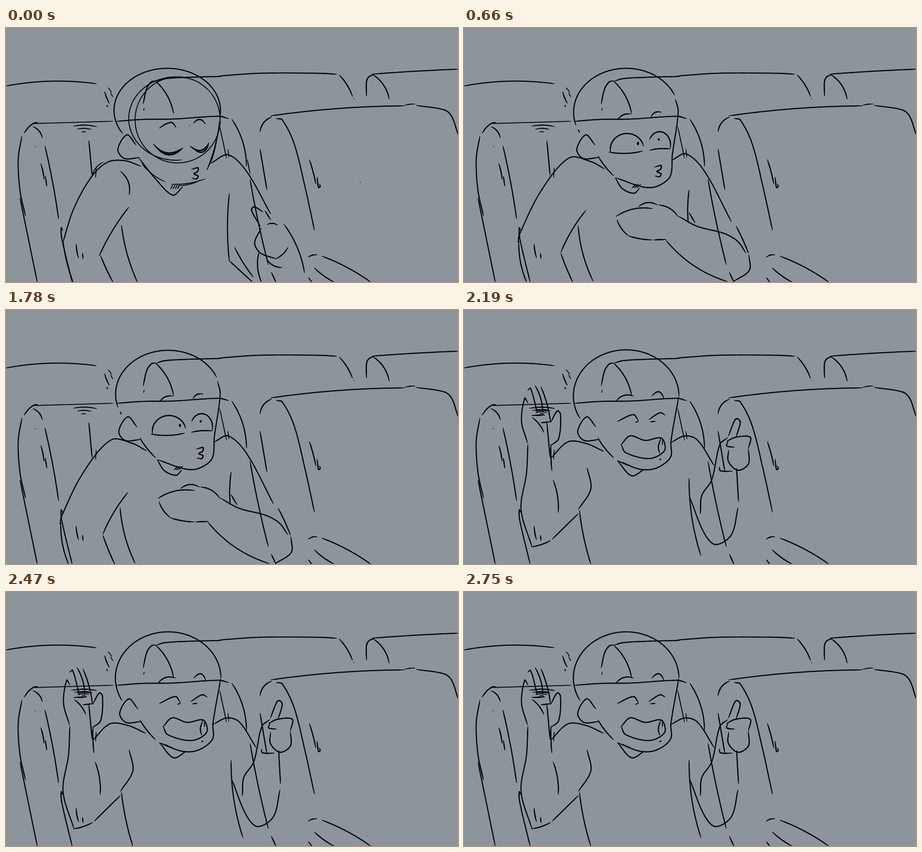
An HTML page with a canvas that plays this animation: 998 by 561 pixels, repeating every 3.04 s.

```html
<!DOCTYPE html>
<html lang="en">
<head>
<meta charset="utf-8">
<title>Seat sketch</title>
<style>
html, body { margin: 0; width: 100%; height: 100%; overflow: hidden; background: #8d959c; }
canvas { display: block; width: 998px; height: 561px; }
</style>
</head>
<body>
<canvas id="stage" width="998" height="561"></canvas>
<script>
const ctx = document.getElementById("stage").getContext("2d");
const INK = "#060708", PAPER = "#8d959c", LOOP = 3040, PEN = 2.45, FINE = 1.8;
const gap = (a, b) => Math.hypot(b[0] - a[0], b[1] - a[1]);

// Brush stroke along points, thinner at both ends
function ink(pts, w) {
  const run = [0];
  for (let i = 1; i < pts.length; i++) run.push(run[i - 1] + gap(pts[i - 1], pts[i]));
  const total = run[run.length - 1];
  for (let i = 1; i < pts.length; i++) {
    const s = (run[i] + run[i - 1]) / 2;
    ctx.lineWidth = w * Math.min(1, 0.55 + Math.min(s, total - s) / 22);
    ctx.beginPath();
    ctx.moveTo(...pts[i - 1]);
    ctx.lineTo(...pts[i]);
    ctx.stroke();
  }
}
function trace(f, w, steps = 40) {
  ink(Array.from({ length: steps + 1 }, (_, i) => f(i / steps)), w);
}

// Curve between two points; h is how far its middle swells to the left of travel
function bow(x0, y0, x1, y1, h = 0, w = PEN) {
  const dx = x1 - x0, dy = y1 - y0, len = Math.hypot(dx, dy);
  trace(t => {
    const k = 4 * h * t * (1 - t) / len;
    return [x0 + dx * t + dy * k, y0 + dy * t - dx * k];
  }, w);
}
// Part of an ellipse, angles in degrees
function oval(cx, cy, rx, ry, from, to, w = PEN) {
  trace(t => {
    const a = (from + (to - from) * t) * Math.PI / 180;
    return [cx + rx * Math.cos(a), cy + ry * Math.sin(a)];
  }, w, 120);
}
// Smooth line through a few key points
function line(...c) {
  const n = c.length / 2, pts = [[c[0], c[1]]];
  const at = i => { const k = Math.max(0, Math.min(n - 1, i)); return [c[2 * k], c[2 * k + 1]]; };
  for (let i = 0; i < n - 1; i++) {
    const a = at(i - 1), b = at(i), d = at(i + 1), e = at(i + 2), len = gap(b, d);
    const m = (p, q, r) => [0, 1].map(j => len * (r[j] - p[j]) / (gap(p, q) + gap(q, r)));
    const u = m(a, b, d), v = m(b, d, e);
    for (let k = 1; k <= 20; k++) {
      const t = k / 20, s = t * t * (3 - 2 * t), p = t * (1 - t) * (1 - t), q = t * t * (t - 1);
      pts.push([0, 1].map(j => b[j] + (d[j] - b[j]) * s + u[j] * p + v[j] * q));
    }
  }
  ink(pts, PEN);
}
function dot(x, y, rx = 1, ry = rx) {
  ctx.beginPath();
  ctx.ellipse(x, y, rx, ry, 0, 0, 7);
  ctx.fill();
}
function turned(x, y, deg, draw) {
  ctx.save();
  ctx.translate(x, y);
  ctx.rotate(deg * Math.PI / 180);
  ctx.translate(-x, -y);
  draw();
  ctx.restore();
}
function moved(x, y, draw) {
  ctx.save();
  ctx.translate(x, y);
  draw();
  ctx.restore();
}

function backRow() {
  bow(0, 128, 199, 123, 8);
  bow(218, 141, 228, 166, -1);
  bow(225, 132, 233, 143, 1, FINE);
  bow(231, 144, 236, 152, 0, FINE);
  bow(223, 171, 224, 174);
  line(303,167, 311,133, 321,119, 330,117);
  bow(330, 117, 370, 189, 7);
  bow(305, 177, 304, 182, 0, FINE);
  line(333,117, 350,112, 400,109, 476,107);
  line(470,106, 560,100, 690,100, 730,102);
  bow(736, 104, 765, 151, 3);
  dot(768, 156);
  line(796,150, 796,118, 801,108, 812,103);
  bow(810, 103, 846, 157, 7);
  bow(808, 102, 998, 91, 1);
}
function leftSeat() {
  bow(62, 211, 236, 206, 0, 2);
  line(245,206, 300,202, 370,201, 470,195, 491,200);
  line(40,232, 50,219, 62,210, 70,209);
  bow(60, 218, 80, 242, 4);
  line(35,239, 27,290, 31,360, 43,415);
  bow(31, 376, 69, 561);
  dot(65, 262);
  bow(86, 261, 116, 421, 2);
  bow(77, 300, 84, 334, 1);
  bow(87, 328, 90, 349);
  for (let i = 0; i < 3; i++) bow(149 + 9 * i, 217 + 6.5 * i, 200 - 12 * i, 218 + 6 * i, 3 - i, 2);
  bow(183, 249, 190, 325);
  bow(199, 309, 198, 330, 0, FINE);
  line(125,447, 122,441, 123,464, 146,561);
  bow(155, 478, 160, 507, -1);
  bow(169, 498, 170, 509);
  bow(499, 202, 531, 305, 8);
  bow(472, 218, 487, 288, 0, FINE);
  bow(490, 268, 492, 285, 0, FINE);
  bow(539, 335, 579, 522, -2);
  bow(586, 540, 596, 561);
}
function rightSeat() {
  bow(585, 194, 878, 172, 5);
  bow(880, 171, 903, 168, 1, FINE);
  line(906,171, 968,181, 984,195, 998,235);
  bow(561, 229, 586, 197, 6);
  line(597,200, 610,203, 636,255, 660,350, 681,446);
  bow(670, 291, 684, 344, 1);
  line(687,330, 690,352, 694,350, 692,345);
  bow(561, 268, 576, 357);
  bow(668, 506, 686, 501, 2);
  bow(698, 504, 805, 561, 4);
  bow(681, 530, 724, 561, -2);
  bow(668, 552, 675, 561);
}

// Parts shared by the poses
const ear = x => moved(x, 0, () => line(289,258, 269,236, 249,268, 263,288, 297,286));
const cheek = () => bow(296, 283, 330, 326, -2);
const pout = (x, y) =>
  line(x - 9,y - 10, x + 5,y - 13, x + 4,y - 5, x - 4,y, x + 5,y + 5, x + 2,y + 11, x - 8,y + 10);
function stubble(x, y, n, lean) {
  for (let i = 0; i < n; i++) bow(x + 5 * i, y + 8, x + 5 * i + lean, y, 0, 2.1);
}

function sleepyEyes() {
  line(339,221, 353,212, 367,209, 375,219);
  bow(414, 210, 440, 212, 9);
  dot(405, 215);
  for (let i = 0; i < 2; i++) {
    bow(326 + 6 * i, 257 + 6 * i, 390 - 2 * i, 265 + 2 * i, -15, 3);
    bow(407 + 6 * i, 261 + 3 * i, 448 - i, 254 + 5 * i, -13, 2.8);
  }
}
function sleepy() {
  oval(356, 182, 117.5, 93, 147, 370);
  oval(375, 200, 104, 92, -72, -277, 2);
  oval(379, 203, 94, 95, -40, 320, 2);
  ear(-2);
  sleepyEyes();
  line(294,288, 330,333, 368,369, 390,351);
  bow(300, 300, 352, 340, -4, FINE);
  bow(365, 345, 440, 333, -4, FINE);
  bow(380, 348, 427, 337, -3, FINE);
  stubble(364, 347, 4, 4);
  pout(419, 322);
  bow(472, 205, 444, 313, 4);
  bow(466, 238, 452, 297, 2, FINE);
  // torso
  line(297,305, 262,293, 225,296, 190,327, 150,398, 126,472);
  bow(126, 470, 148, 561, -3);
  bow(215, 296, 190, 328, -5, FINE);
  bow(253, 317, 272, 368, 8);
  bow(271, 396, 206, 503, -4);
  bow(209, 503, 236, 561, -1);
  bow(255, 436, 290, 561, -5);
  line(452,299, 490,280, 530,315, 584,410);
  bow(533, 291, 539, 322, 0, FINE);
  bow(493, 366, 493, 514, -4);
  bow(493, 514, 544, 561);
  bow(505, 485, 546, 550, -2);
  // hand
  line(561,437, 542,402, 548,395, 567,406);
  bow(572, 404, 584, 423);
  bow(577, 434, 599, 435, 3);
  bow(614, 434, 659, 540, 7);
  line(563,443, 549,475, 562,497, 597,510);
  bow(597, 509, 622, 485, -3);
  bow(576, 511, 609, 529, -5);
  bow(559, 494, 564, 561, -6);
  dot(782, 341);
}

function proudEyes() {
  bow(339, 203, 368, 190, 5);
  bow(413, 196, 435, 186, 5);
  oval(360, 268, 37, 35, 170, 348);
  bow(320, 274, 394, 272, -4);
  dot(384, 255, 2.4, 3.8);
  oval(432, 258, 24, 29, 205, 375);
  bow(410, 270, 455, 267, 2);
  dot(430, 246, 2.3, 2.8);
}
function proudArm() {
  bow(336, 416, 416, 399, 8);
  bow(386, 394, 427, 391, 7);
  bow(430, 391, 472, 416, 6);
  line(474,416, 515,438, 575,454, 604,471, 622,496);
  bow(338, 424, 362, 458, -3);
  bow(363, 459, 415, 468, -2);
  bow(419, 468, 446, 467);
  bow(446, 469, 581, 560, -12);
}
function proudBody() {
  oval(358, 186, 116, 97, 163, 337);
  line(467,158, 473,185, 460,280, 455,328, 425,350, 395,351, 336,331);
  bow(252, 225, 255, 230);
  ear(0);
  cheek();
  line(334,331, 350,355, 375,365, 388,354);
  stubble(371, 345, 3, 9);
  pout(430, 317);
  line(310,311, 280,295, 232,287, 170,360, 123,455, 119,473);
  bow(121, 470, 138, 561, -5);
  bow(269, 403, 214, 495, -4);
  bow(214, 498, 240, 561, -1);
  bow(252, 437, 285, 559, -6);
  line(459,292, 490,278, 530,315, 590,427);
  bow(601, 438, 628, 497, 1);
  bow(497, 358, 495, 430, -2);
  bow(497, 408, 510, 430);
  line(629,501, 630,535, 595,560);
}
function proud() {
  proudBody();
  proudEyes();
  proudArm();
}
function waking() {
  proudBody();
  moved(2, -4, sleepyEyes);
  turned(610, 530, -8, proudArm);
}

function glance() {
  oval(360, 195, 114, 108, 158, 342);
  line(470,167, 474,185, 457,285, 452,330, 425,348, 389,347);
  ear(-6);
  cheek();
  bow(334, 331, 375, 349, -2);
  line(335,333, 350,357, 368,366, 385,350);
  line(372,349, 379,346, 378,352);
  bow(340, 199, 370, 187, 3);
  line(416,194, 433,185, 446,184, 449,195);
  oval(358, 272, 42, 52, 170, 285);
  bow(317, 281, 394, 279, -3);
  bow(384, 231, 396, 275, 4);
  dot(327, 269, 2.5);
  bow(404, 270, 408, 237, 1);
  oval(427, 249, 22, 30, 223, 390);
  bow(404, 270, 450, 267);
  dot(411, 255, 2.6, 4);
  pout(426, 315);
  line(311,308, 280,292, 236,285, 180,340, 123,437, 117,465);
  bow(119, 459, 132, 561, -4);
  bow(268, 411, 215, 490, -3);
  bow(215, 494, 236, 561, 4);
  bow(251, 440, 281, 561, -5);
  line(458,290, 503,282, 545,330, 605,450, 620,487);
  bow(499, 360, 495, 425, -1);
  bow(496, 407, 501, 422);
  // folded arm
  line(382,392, 390,387, 447,390, 474,420);
  line(419,403, 392,396, 330,422, 344,437);
  bow(344, 437, 378, 474, -3);
  bow(386, 475, 413, 475);
  bow(416, 473, 442, 470);
  bow(442, 471, 562, 561, -9);
  line(481,422, 570,453, 605,467, 625,510, 609,549);
  dot(602, 559);
}

function laughHead() {
  oval(358, 190, 116.5, 102, 151, 360);
  line(474,192, 457,290, 456,325, 425,349, 390,352, 339,333);
  ear(2);
  cheek();
  line(339,333, 370,366, 398,352);
  bow(352, 337, 365, 344);
  bow(356, 341, 366, 343);
  bow(336, 201, 374, 190, 7);
  bow(415, 190, 441, 195, 12);
  line(339,246, 374,231, 385,244);
  bow(379, 248, 385, 246);
  line(408,242, 433,227, 444,232);
  bow(412, 247, 422, 246);
  line(347,297, 367,278, 400,288, 436,283, 443,310, 410,328, 357,315, 347,297);
  line(434,284, 429,303, 432,316);
  bow(438, 288, 438, 297);
  bow(432, 331, 435, 329);
}
function laughBody() {
  line(308,312, 270,295, 230,291, 192,327);
  line(272,349, 280,395, 253,440);
  bow(255, 443, 280, 561, -3);
  bow(195, 506, 252, 450);
  line(458,292, 488,278, 515,287, 552,343);
  bow(497, 372, 523, 542, -7);
}
function raisedArm() {
  line(141,297, 138,360, 126,440, 150,523);
  bow(150, 523, 191, 509, -2);
  bow(197, 376, 208, 447, 4);
  bow(192, 297, 194, 355, -1);
  line(140,293, 127,245, 134,195, 141,205);
  line(141,177, 147,173, 162,227);
  bow(157, 167, 174, 226, 4);
  bow(170, 170, 191, 248, 3);
  for (let i = 0; i < 3; i++) bow(144 + 7 * i, 217 + 5 * i, 199 - 8 * i, 217 + 5 * i, 2, FINE);
  bow(150, 233, 178, 232);
  bow(170, 249, 190, 247);
  bow(151, 238, 176, 270, 3);
  line(192,247, 206,223, 213,230, 209,284, 192,299);
}
function thumbUp() {
  line(499,415, 530,492, 555,518, 590,497, 605,437);
  line(522,450, 525,410, 547,375, 565,297, 582,282);
  line(584,278, 598,243, 604,240, 610,248, 601,280);
  line(580,290, 600,281, 632,281, 628,306);
  line(583,290, 580,300, 597,303);
  line(584,310, 584,335, 605,354, 628,340, 628,308);
  line(564,347, 566,355, 592,356);
  bow(602, 350, 606, 423);
}
function laugh() {
  laughHead();
  laughBody();
  raisedArm();
  thumbUp();
}
function wave() {
  moved(0, -3, laughHead);
  moved(0, -1, laughBody);
  turned(150, 523, -22, raisedArm);
  moved(0, -2, thumbUp);
}

function poseAt(t) {
  if (t < 540) return sleepy;
  if (t < 660) return waking;
  if (t < 2190) return t >= 1280 && t < 1780 ? glance : proud;
  // waves for 120 ms after each 160 ms rest, twice
  return t < 2750 && (t - 2190) % 280 >= 160 ? wave : laugh;
}

let shown = null;
const start = performance.now();

function tick() {
  const pose = poseAt((performance.now() - start) % LOOP);
  if (pose !== shown) {
    ctx.fillStyle = PAPER;
    ctx.fillRect(0, 0, 998, 561);
    ctx.fillStyle = ctx.strokeStyle = INK;
    ctx.lineCap = ctx.lineJoin = "round";
    backRow();
    leftSeat();
    rightSeat();
    pose();
    shown = pose;
  }
  requestAnimationFrame(tick);
}
tick();
</script>
</body>
</html>
```
